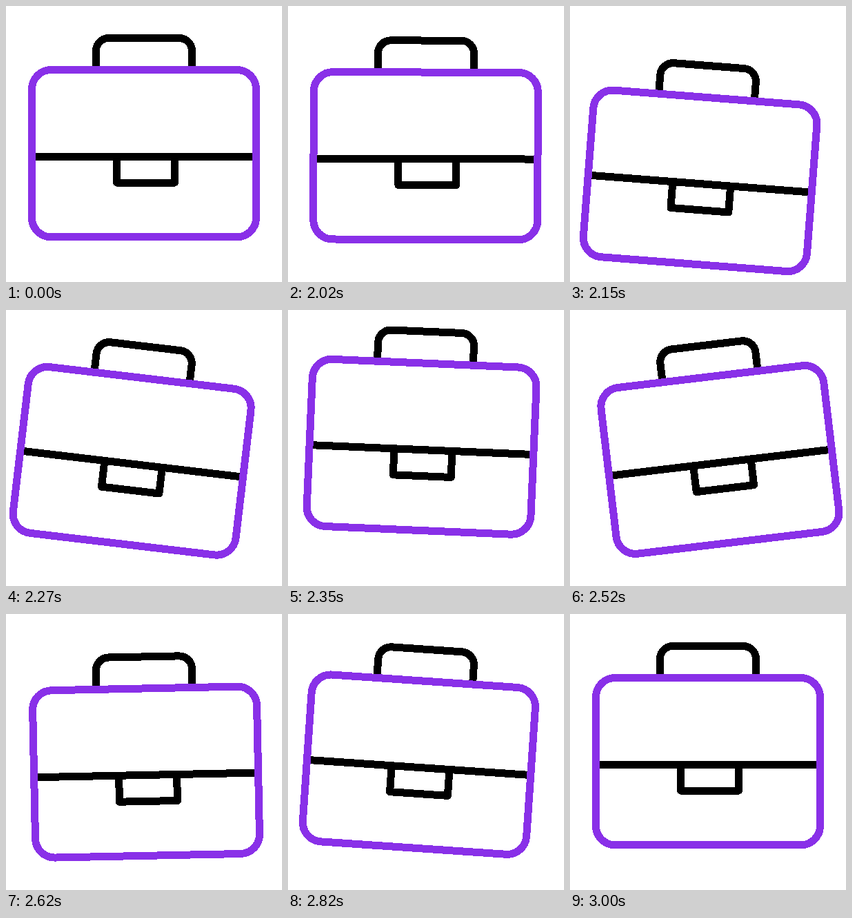
These frames come from a looping animation (400 px wide and 400 px high, 3020 ms). An HTML page without scripts:

```html
<!DOCTYPE html>
<html lang="en">
<head>
<meta charset="utf-8">
<title>Briefcase hop</title>
<style>
  @property --odd { syntax: "<number>"; inherits: true; initial-value: 0; }
  @property --even { syntax: "<number>"; inherits: true; initial-value: 0; }

  html, body { margin: 0; width: 100%; height: 100%; overflow: hidden; background: #fff; }
  svg { display: block; width: 100vw; height: 100vh; }

  path, rect {
    fill: none;
    stroke: #000;
    stroke-width: 11;
    stroke-linecap: round;
    stroke-linejoin: round;
    shape-rendering: crispEdges;
  }
  .body { stroke: #8930e8; }

  /* Two interleaved counters give a clock of 40 ticks, 30 and 20 ms apart. */
  .case {
    animation: odd 3020ms infinite, even 3020ms infinite;
    --t: (var(--odd) + var(--even));

    /* progress of each vertical move */
    --y1: clamp(0, var(--t) / 5.5, 1);
    --y2: clamp(0, (var(--t) - 5.5) / 9.9, 1);
    --y3: clamp(0, (var(--t) - 15.4) / 9.1, 1);
    --y4: clamp(0, (var(--t) - 24.5) / 13.5, 1);

    /* progress of each swing */
    --r1: clamp(0, var(--t) / 10.2, 1);
    --r2: clamp(0, (var(--t) - 10.2) / 10, 1);
    --r3: clamp(0, (var(--t) - 20.2) / 9.8, 1);
    --r4: clamp(0, (var(--t) - 30) / 10, 1);

    /* each term is a distance times a smoothstep */
    --drop: calc(
      40.5 * var(--y1) * var(--y1) * (3 - 2 * var(--y1))
      - 59 * var(--y2) * var(--y2) * (3 - 2 * var(--y2))
      + 34 * var(--y3) * var(--y3) * (3 - 2 * var(--y3))
      - 15.5 * var(--y4) * var(--y4) * (3 - 2 * var(--y4)));
    --turn: calc(
      7 * var(--r1) * var(--r1) * (3 - 2 * var(--r1))
      - 14 * var(--r2) * var(--r2) * (3 - 2 * var(--r2))
      + 12 * var(--r3) * var(--r3) * (3 - 2 * var(--r3))
      - 5 * var(--r4) * var(--r4) * (3 - 2 * var(--r4)));

    transform-origin: 200px 66px;
    transform: translateY(calc(var(--drop) * 1px)) rotate(calc(var(--turn) * 1deg));
  }

  @keyframes odd {
    0% { --odd: 0; animation-timing-function: step-end; }
    66.88% { --odd: 0; animation-timing-function: steps(20, start); }
    100% { --odd: 20; }
  }
  @keyframes even {
    0% { --even: 0; animation-timing-function: step-end; }
    66.22% { --even: 0; animation-timing-function: steps(20, end); }
    99.33%, 100% { --even: 20; }
  }
</style>
</head>
<body>
<svg viewBox="0 0 400 400">
  <g class="case">
    <path d="M130.5 92.5V65a18.5 18.5 0 0 1 18.5-18.5H251a18.5 18.5 0 0 1 18.5 18.5V92.5"/>
    <path d="M37.5 218H362.5"/>
    <path d="M160.5 218V256H244.5V218"/>
    <rect class="body" x="37.5" y="92.5" width="325" height="242.4" rx="28"/>
  </g>
</svg>
</body>
</html>
```
